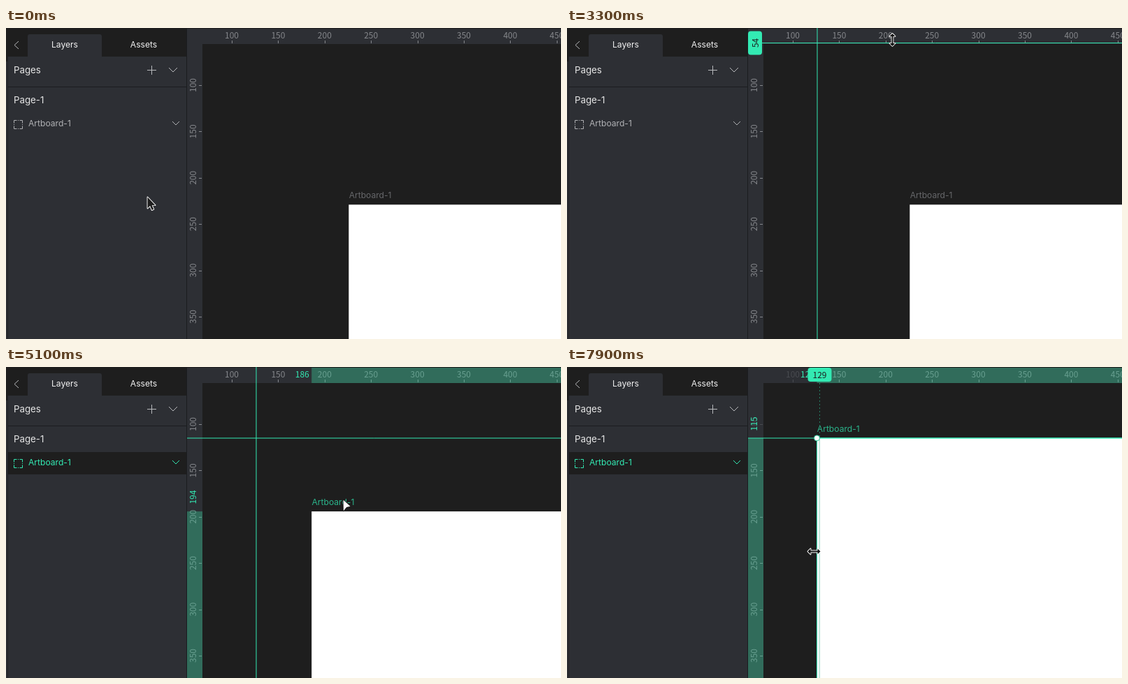
Recreate the animation shown at these times as an HTML page with a canvas. Size 794 by 446 pixels, loop 8 s.

```html
<!DOCTYPE html>
<html lang="en">
<head>
<meta charset="utf-8">
<title>Guides and snapping</title>
<style>
html, body { margin: 0; width: 100%; height: 100%; overflow: hidden; background: #1e1e1e; }
canvas { display: block; width: 794px; height: 446px; }
</style>
</head>
<body>
<canvas id="stage" width="794" height="446"></canvas>
<script>
const ctx = document.getElementById('stage').getContext('2d');
const W = 794, H = 446, LOOP = 8000, STEP = 100;
const DARK = '#1e1e1e', PANEL = '#2d2f34', MINT = '#33eab3', TINT = '#316c5b';
const ICON = '#b8b9bc', EDGE = '#1b1c1f';
const UI = 'Inter, "Open Sans", sans-serif';
const DIGITS = '"Noto Sans CJK SC", "Noto Sans CJK JP", "Noto Sans CJK", "Noto Sans", sans-serif';

// Panel and ruler layout
const SIDE = 259, RULER = 22, LEFT = SIDE + RULER, TOP = 1 + RULER;
const SCALE = 1.328, ZERO_X = 190.2, ZERO_Y = -50.8;
const toX = v => ZERO_X + v * SCALE;
const toY = v => ZERO_Y + v * SCALE;

const within = (t, from, to) => t >= from && t < to;
const ramp = (t, from, to) => Math.min(1, Math.max(0, (t - from) / (to - from)));
const mix = (a, b, k) => a + (b - a) * k;

// Motion: guides are pulled out of the rulers, then the board is dragged onto them
const guideX = t => mix(273, 357.5, ramp(t, 1000, 1500)) + 4 * ramp(t, 7600, 7900);
const guideY = t => mix(2, 99.3, ramp(t, 3200, 3700)) + 2.6 * ramp(t, 3800, 4100);

function board(t) {
  const k = ramp(t, 4900, 5400);
  const lift = 16 * ramp(t, 5400, 5700) + 11 * ramp(t, 5800, 6000);
  return [toX(mix(226, 126, k)), toY(mix(229, 142, k) - lift)];
}

function cursor(t) {
  let x = 202, y = 242;
  const go = (from, to, px, py) => {
    const k = ramp(t, from, to);
    x = mix(x, px, k);
    y = mix(y, py, k);
  };
  go(300, 400, 210, 242);
  go(500, 800, 273, 247);
  x += guideX(Math.min(t, 1500)) - guideX(0);
  go(1800, 2200, 456, 87);
  go(2200, 2500, 458, 41);
  go(2600, 3100, 465.5, 18);
  go(3200, 3700, x, guideY(t) - 9);
  go(3800, 4100, x, guideY(t));
  go(4200, 4700, 537, 238);
  go(4900, 5400, 401, 120);
  go(5400, 6000, 410, 92);
  go(6300, 6500, 370, 240);
  go(6600, 6800, 311, 282);
  go(7000, 7500, 353.5, 264.5);
  return [x, y];
}

function sceneAt(t) {
  const [bx, by] = board(t), [cx, cy] = cursor(t);
  const gx = guideX(t), gy = guideY(t);
  const pullX = within(t, 1100, 1900) || t >= 7700;
  const pullY = within(t, 3300, 4300);
  const hover = t >= 6500 && Math.abs(cx - gx) < 5;
  return {
    t, bx, by, cx, cy, gx, gy, pullX, pullY,
    selected: t >= 4700,
    moving: within(t, 5000, 6400),
    badgeX: pullX || hover,
    across: pullX || hover || within(cx, SIDE, LEFT),
    down: pullY || cy < TOP
  };
}

function rect(x, y, w, h, color) {
  ctx.fillStyle = color;
  ctx.fillRect(x, y, w, h);
}

function rounded(x, y, w, h, radii, color) {
  ctx.beginPath();
  ctx.roundRect(x, y, w, h, radii);
  ctx.fillStyle = color;
  ctx.fill();
}

function trace(points) {
  ctx.beginPath();
  points.forEach(([x, y], i) => i ? ctx.lineTo(x, y) : ctx.moveTo(x, y));
}

function path(points, color, dash = []) {
  trace(points);
  ctx.strokeStyle = color;
  ctx.lineWidth = 1;
  ctx.setLineDash(dash);
  ctx.stroke();
  ctx.setLineDash([]);
}

function shape(points, fill, stroke) {
  trace(points);
  ctx.closePath();
  ctx.lineJoin = 'round';
  ctx.lineWidth = 1.8;
  ctx.strokeStyle = stroke;
  ctx.stroke();
  ctx.fillStyle = fill;
  ctx.fill();
  ctx.lineJoin = 'miter';
}

function text(s, x, y, color, size = 12.1, align = 'left', family = UI) {
  ctx.font = `${size}px ${family}`;
  ctx.textAlign = align;
  ctx.fillStyle = color;
  ctx.fillText(s, x, y);
}

// Ruler number centred on a point, optionally reading upwards
function number(v, x, y, color, upright = true) {
  ctx.save();
  ctx.translate(x, y);
  if (!upright) ctx.rotate(-Math.PI / 2);
  text(v, 0, 4.5, color, 12, 'center', DIGITS);
  ctx.restore();
}

function badge(v, x, y, upright) {
  const w = upright ? 34 : 20, h = 54 - w;
  rounded(x - w / 2, y - h / 2, w, h, 4, MINT);
  number(Math.round(v), x, y, DARK, upright);
}

function drawRulers({ selected, bx, by }) {
  rect(SIDE, 1, W - SIDE, RULER, PANEL);
  rect(SIDE, 1, RULER, H, PANEL);
  if (selected) {
    rect(bx, 1, W - bx, RULER, TINT);
    rect(SIDE, by, RULER, H - by, TINT);
  }
  const shade = (p, edge) => {
    if (!selected) return '#85878b';
    if (p >= edge) return '#689f90';
    return edge - p < 44 ? '#494b50' : '#85878b';
  };
  for (let v = 100; v <= 450; v += 50) {
    const x = toX(v), y = toY(v);
    number(v, x, 10, shade(x, bx));
    rect(Math.round(x), 18, 1, 4, shade(x, bx));
    number(v, 267.5, y, shade(y, by), false);
    rect(276, Math.round(y), 4, 1, shade(y, by));
  }
  if (selected) {
    number(Math.round((bx - ZERO_X) / SCALE), bx - 13.5, 10.5, MINT);
    number(Math.round((by - ZERO_Y) / SCALE), 267.5, by - 20.5, MINT, false);
  }
}

function chevron(x, y, size, color) {
  path([[x - size, y - size / 2], [x, y + size / 2], [x + size, y - size / 2]], color);
}

function drawPanel({ selected }) {
  rect(0, 0, SIDE, H, PANEL);
  rect(0, 0, SIDE, 41, DARK);
  rect(0, 41, 2, 7, DARK);
  rect(2, 41, 1, H, '#212226');
  rect(258, 0, 1, H, EDGE);
  rect(3, 84, 255, 1, EDGE);
  rounded(31, 9, 106, 32, [3, 3, 0, 0], PANEL);
  path([[18, 19], [12, 24.5], [18, 30]], ICON);
  text('Layers', 84, 28, '#f2f2f2', 12.1, 'center');
  text('Assets', 197, 28, '#f2f2f2', 12.1, 'center');
  text('Pages', 11, 65, '#e6e6e6', 13.3);
  text('Page-1', 11, 108, '#e6e6e6', 13.3);
  rect(202, 60, 13, 1, ICON);
  rect(208, 54, 1, 13, ICON);
  chevron(239, 60, 6, ICON);

  if (selected) rect(3, 122, 255, 32, DARK);
  const color = selected ? MINT : '#b0b1b4';
  text('Artboard-1', 32, 141, color);
  chevron(243, 136.5, 5, color);
  ctx.strokeStyle = color;
  ctx.setLineDash([4, 1.5, 1, 1.5, 4, 0]);
  ctx.strokeRect(11.5, 132.5, 12, 12);
  ctx.setLineDash([]);
}

const POINTER = [[0, 0], [0, 16], [3.6, 12.6], [6.2, 18.6], [8.8, 17.4], [6.2, 11.7], [11, 11.7]];
const SELECT = [[0, 0], [10, 9], [4.6, 10.2], [0.3, 15.5]];
const HALF_ARROW = [[-9, 0], [-5, -4], [-5, -1]];
const mirror = (points, sx, sy) => points.map(([x, y]) => [x * sx, y * sy]);
const RESIZE = [
  ...HALF_ARROW, ...mirror(HALF_ARROW, -1, 1).reverse(),
  ...mirror(HALF_ARROW, -1, -1), ...mirror(HALF_ARROW, 1, -1).reverse()
];

function drawCursor({ cx, cy, across, down }) {
  ctx.save();
  ctx.translate(cx, cy);
  if (across || down) {
    if (down) ctx.rotate(Math.PI / 2);
    shape(RESIZE, '#111', '#fff');
  } else if (cx < SIDE) {
    ctx.translate(0.5, 0.5);
    shape(POINTER, DARK, '#fff');
  } else {
    shape(SELECT, '#fff', '#1a1a1a');
  }
  ctx.restore();
}

function drawMark(x, y) {
  for (const s of [-3, 3]) path([[x - 3, y - s], [x + 3, y + s]], '#a7a2bd');
}

function drawGuides({ t, gx, gy, bx, by, pullX, pullY, moving }) {
  // A held line is crisp; a resting one straddles two pixels and looks softer
  const align = (p, held) => held ? Math.floor(p) + 0.5 : Math.round(p);
  const x = align(gx, pullX), y = align(gy, pullY);
  const column = [[x, 0], [x, H]], row = [[SIDE, y], [W, y]];
  if (t >= 7700) {
    path([[x, TOP], [x, by]], '#247a62', [2, 3]);
    path([[x, by], [x, H]], '#a9ddcd');
  } else if (t >= 1100) {
    path(column, MINT);
  }
  if (t >= 3300) path(row, MINT);

  // Alignment hints while the board is being moved
  if (moving && t >= 5400) {
    const hint = 'rgba(95, 195, 175, .6)';
    path(column, hint);
    if (t >= 6000) path(row, hint);
    const my = by + (t < 5900 ? 3 : 0);
    drawMark(bx, my);
    drawMark(bx, my + 254.5);
    if (t >= 6200) drawMark(bx + 341.5, my);
  }
}

function drawSelection({ t, bx, by }) {
  if (t >= 7700) rect(bx + 1, by + 1, 2.5, H, '#eaf8f4');
  path([[W, by], [bx, by], [bx, H]], MINT);
  ctx.beginPath();
  ctx.arc(bx, by, 4, 0, 7);
  ctx.fillStyle = '#fff';
  ctx.fill();
  ctx.strokeStyle = '#2bc798';
  ctx.stroke();
}

function draw(t) {
  const s = sceneAt(t);
  rect(0, 0, W, H, DARK);
  rect(s.bx, s.by, W, H, '#fff');
  text('Artboard-1', s.bx + 0.3, Math.round(s.by) - 9, s.selected ? '#2bb48b' : '#66676a');
  drawRulers(s);
  drawGuides(s);
  if (s.selected && !s.moving) drawSelection(s);
  if (s.badgeX) badge((s.gx - ZERO_X) / SCALE, s.gx, 11, true);
  drawPanel(s);
  if (s.pullY) badge((s.gy - ZERO_Y) / SCALE, 269, s.gy, false);
  drawCursor(s);
}

const start = performance.now();
function tick() {
  const t = (performance.now() - start) % LOOP;
  draw(Math.floor(t / STEP) * STEP);
  requestAnimationFrame(tick);
}
tick();
</script>
</body>
</html>
```
